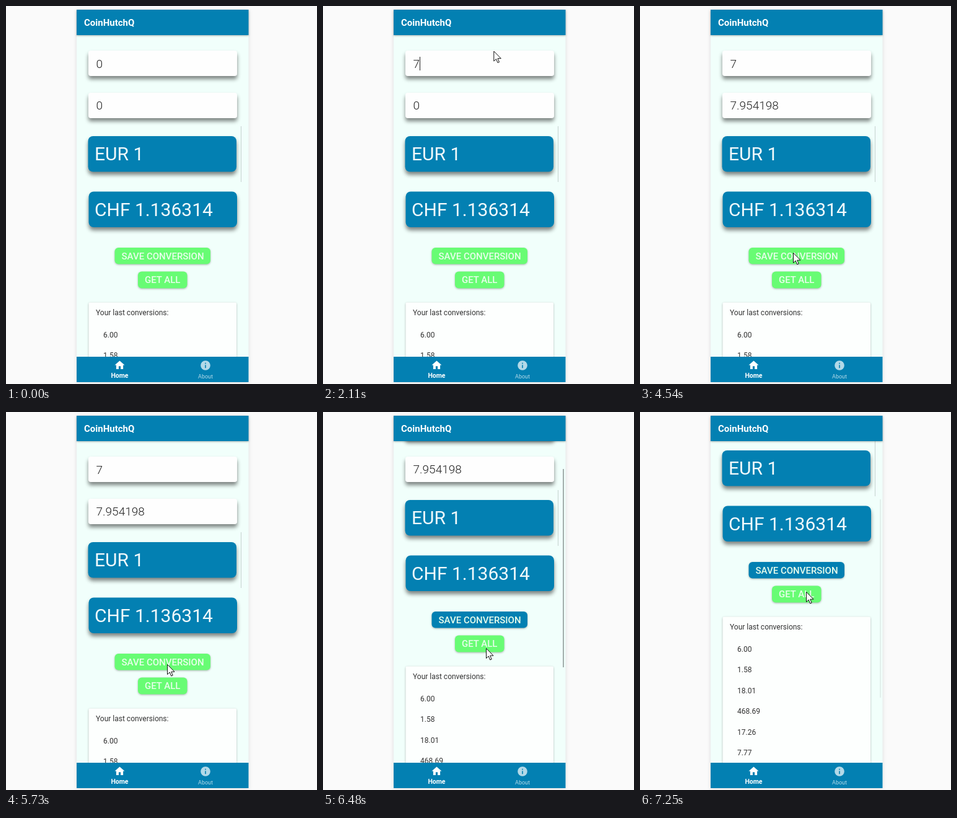
An HTML page that plays this animation: 502x610 px, repeating every 8000 ms.

```html
<!DOCTYPE html>
<html lang="en">
<head>
<meta charset="utf-8">
<title>Currency converter demo</title>
<style>
html, body { margin: 0; width: 100%; height: 100%; overflow: hidden; background: #fafafa; }
svg { display: block; font-family: Roboto, "Liberation Sans", sans-serif; }
.blue { fill: #0380b2; }
.raised { filter: drop-shadow(0 5px 3px rgba(0, 0, 0, .48)); }
.soft { filter: drop-shadow(0 1px 1.5px rgba(0, 0, 0, .3)); }
.phone { filter: drop-shadow(0 1px 3px rgba(0, 0, 0, .12)); }
.field { font-size: 19px; font-weight: 300; fill: #222; }
.rate { font-size: 30px; fill: #f3fafc; }
.button { font-size: 15px; font-weight: 500; fill: #e9fdec; }
.list { font-size: 12px; fill: #333; }
</style>
</head>
<body>
<svg width="502" height="610" viewBox="0 0 502 610">
  <clipPath id="view"><rect x="114" y="47" width="277.5" height="519"/></clipPath>
  <rect class="phone" x="114" y="6" width="277.5" height="601" fill="#f1fffb"/>
  <g clip-path="url(#view)">
    <g id="content">
      <g class="raised" fill="#fefefe">
        <rect x="133" y="72" width="240" height="41" rx="4"/>
        <rect x="133" y="140" width="240" height="41" rx="4"/>
      </g>
      <text id="amount" class="field" x="145.5" y="100">0</text>
      <rect id="caret" y="82" width="1" height="22" fill="#222"/>
      <text id="result" class="field" x="145.5" y="167">0</text>
      <g class="raised blue">
        <rect x="132.5" y="210" width="239.5" height="57.5" rx="8"/>
        <rect x="133.5" y="299.5" width="239.5" height="57.5" rx="8"/>
      </g>
      <text class="rate" x="143" y="249">EUR 1</text>
      <text class="rate" x="143" y="339">CHF 1.136314</text>
      <rect x="379" y="194" width="1" height="90" fill="#c5d1cf"/>
      <g class="soft">
        <rect id="save" x="175.5" y="390" width="154.5" height="26.5" rx="6"/>
        <rect x="213" y="428.5" width="79.5" height="27" rx="6" fill="#68fc74"/>
        <rect x="133.5" y="478.5" width="238.5" height="360" rx="2" fill="#fdfffe"/>
      </g>
      <text class="button" x="186.5" y="408.5">SAVE CONVERSION</text>
      <text class="button" x="224" y="447">GET ALL</text>
      <g id="list" class="list"><text x="145" y="499">Your last conversions:</text></g>
    </g>
    <rect id="bar" x="387" width="2" height="320" fill="#a3aeac"/>
  </g>
  <rect class="blue soft" x="114" y="6" width="277.5" height="41"/>
  <text x="126" y="32" font-size="15" font-weight="700" fill="#fff">CoinHutchQ</text>
  <rect class="blue" x="114" y="566" width="277.5" height="41"/>
  <path transform="translate(173.9 570) scale(.8)" fill="#fff" d="M10 20v-6h4v6h5v-8h3L12 3 2 12h3v8z"/>
  <circle cx="322" cy="580" r="7.8" fill="#b3d9e8"/>
  <path class="blue" d="M321.2 575.8h1.6v1.7h-1.6zM321.2 579.2h1.6v5h-1.6z"/>
  <g text-anchor="middle">
    <text x="183.5" y="600" font-size="10.5" font-weight="700" fill="#fff">Home</text>
    <text x="322" y="600.5" font-size="9" fill="#b3d9e8">About</text>
  </g>
  <path id="pointer" d="M.5.5V16.5L4.2 13 6.7 19 9.2 18 6.7 12.2H12Z" fill="#fff" stroke="#111"/>
</svg>
<script>
const $ = id => document.getElementById(id);

["6.00", "1.58", "18.01", "468.69", "17.26", "7.77"].forEach((value, i) => {
  const row = document.createElementNS("http://www.w3.org/2000/svg", "text");
  row.textContent = value;
  row.setAttribute("x", 157);
  row.setAttribute("y", 535 + i * 33.4);
  $("list").append(row);
});

// Screen refreshes: [first, last, count]
const ticks = [[0, 0, 1], [110, 810, 10], [960, 1190, 4], [1340, 1420, 2], [1590, 1590, 1],
  [1810, 2110, 2], [2270, 2570, 2], [2840, 3610, 11], [3700, 3850, 3], [4000, 4540, 8],
  [5010, 5160, 3], [5480, 5560, 2], [5730, 6480, 11], [6560, 7250, 10]]
  .flatMap(([a, b, n]) => Array.from({ length: n }, (_, i) => a + (b - a) * i / Math.max(1, n - 1)));

// Keyframes: [time, value, ...]
const pointerPath = [[110, 409, 598], [340, 355, 400], [580, 285, 170], [735, 259, 92], [810, 271.5, 103.5],
  [960, 271.5, 103.5], [1190, 273, 70], [1420, 274, 70], [1590, 275.5, 70], [2840, 275, 76],
  [3148, 247, 135], [3380, 246, 260], [3610, 242, 373], [3700, 232, 400], [3850, 222, 436],
  [4000, 224, 435], [4310, 240, 410], [4540, 247, 398], [5010, 249, 401], [5160, 254, 409],
  [5480, 257, 409], [5560, 260, 408], [5730, 260, 407], [6030, 262, 398], [6330, 263, 383],
  [6480, 263, 381], [6790, 264, 365], [7020, 267, 310], [7250, 268, 290]];
const scrollPath = [[6330, 0], [6405, 18], [6480, 68], [6560, 100], [6640, 128], [6790, 148]];
const fadePath = [[6330, 0], [6400, 1], [7020, 1], [7250, .2]];

function at(path, t) {
  const i = path.findIndex(key => key[0] > t);
  if (i < 0) return path[path.length - 1].slice(1);
  if (i === 0) return path[0].slice(1);
  const a = path[i - 1], b = path[i], k = (t - a[0]) / (b[0] - a[0]);
  return a.slice(1).map((v, j) => v + (b[j + 1] - v) * k);
}

const within = (t, spans) => spans.some(([a, b]) => t >= a && t < b);

function draw(now) {
  const time = now % 8000;
  const t = ticks.filter(tick => tick <= time + .5).pop();
  const hint = within(t, [[1810, 2110]]);
  const [scroll] = at(scrollPath, t);

  $("amount").textContent = hint ? "Euro" : t < 1810 ? "0" : "7";
  $("amount").style.fill = hint ? "#999" : "";
  $("result").textContent = t < 2270 ? "0" : "7.954198";
  $("caret").setAttribute("x", hint ? 146 : 156);
  $("caret").style.opacity = +within(t, [[960, 1420], [1810, 2570], [3060, 3600], [4070, 4530], [5080, 5550]]);
  $("save").style.fill = t < 5870 ? "#68fc74" : "#0380b2";

  $("content").setAttribute("transform", `translate(0 ${-Math.round(scroll)})`);
  $("bar").setAttribute("y", 50.3 + scroll * .6125);
  $("bar").style.opacity = at(fadePath, t)[0];
  $("pointer").setAttribute("transform", `translate(${at(pointerPath, t)})`);
  $("pointer").style.opacity = +(t >= 110);
  requestAnimationFrame(() => draw(performance.now() - start));
}
const start = performance.now();
draw(0);
</script>
</body>
</html>
```
